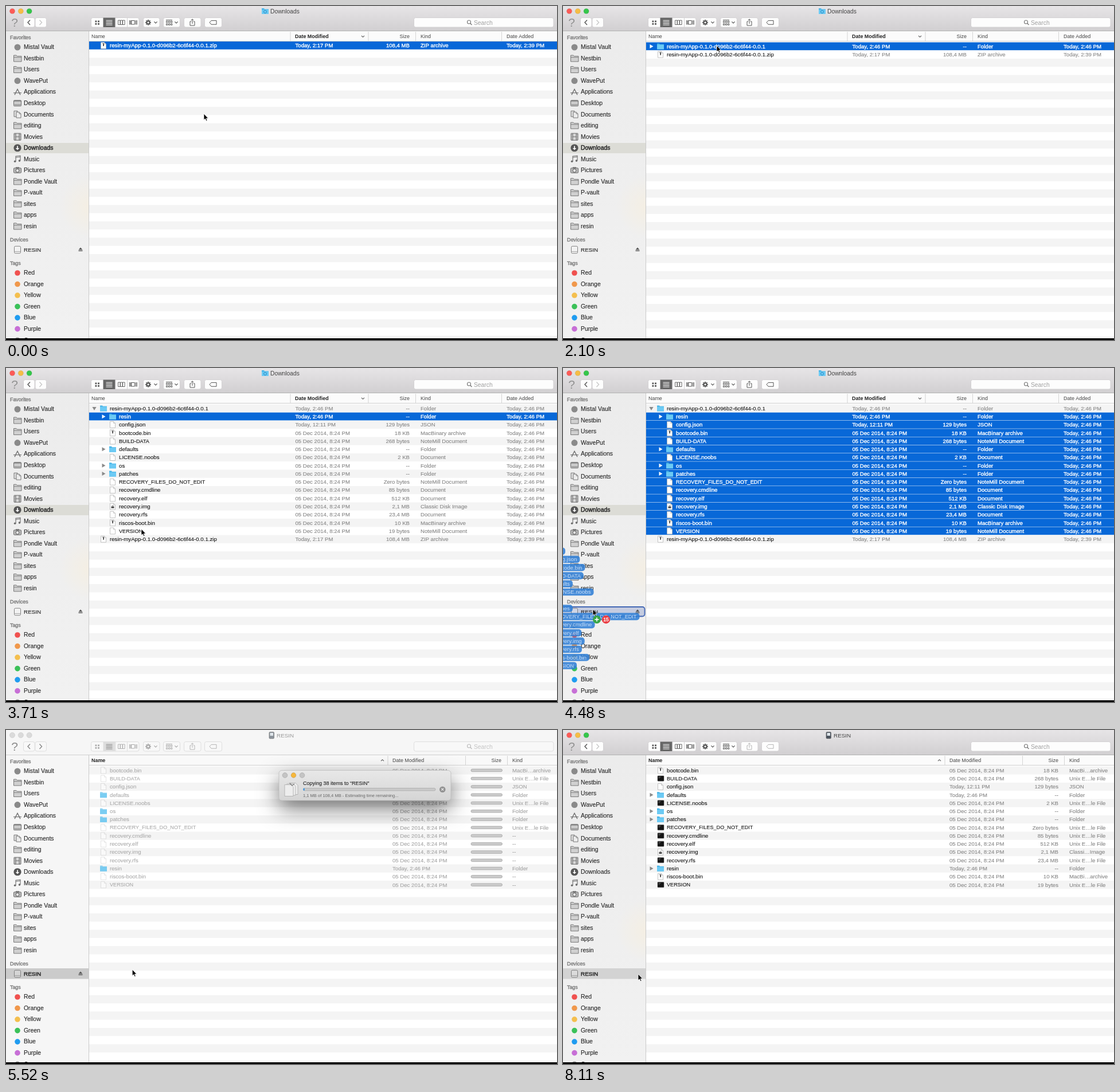
Animation of 961 by 583 pixels, one loop 8180 ms. Source, as an HTML page with a canvas:

```html
<!DOCTYPE html>
<html lang="en">
<head>
<meta charset="utf-8">
<title>Copying files</title>
<style>
html, body { margin: 0; width: 100%; height: 100%; overflow: hidden; background: #000; }
canvas { display: block; }
</style>
</head>
<body>
<canvas id="stage" width="961" height="583"></canvas>
<script>
const c = document.getElementById('stage').getContext('2d');
const LOOP = 8180, CUT = 4960, ROW = 14.27, TOP = 63.3, BLUE = '#0868d8';
const T = { unzip: 1400, expand: 2660, pick: 3290, pickAll: 3850, drag: 4060, rows: 5110, copy: 5520, done: 7200, eject: 8000 };
const clamp = (v, a = 0, b = 1) => Math.min(b, Math.max(a, v));

// ---- drawing helpers ----
function text(s, x, y, size, color, { align = 'left', bold = false, heavy = 0 } = {}) {
  c.font = `${bold ? 'bold ' : ''}${size}px "Liberation Sans", Arial, sans-serif`;
  c.textAlign = align;
  c.fillStyle = c.strokeStyle = color;
  c.fillText(s, x, y + size * .35);
  if (heavy) { c.lineWidth = heavy; c.strokeText(s, x, y + size * .35); }
}
function rect(x, y, w, h, fill) { c.fillStyle = fill; c.fillRect(x, y, w, h); }
function paint(fill, stroke, width = 1) {
  if (fill) { c.fillStyle = fill; c.fill(); }
  if (stroke) { c.strokeStyle = stroke; c.lineWidth = width; c.stroke(); }
}
function box(x, y, w, h, r, fill, stroke, width) {
  c.beginPath(); c.roundRect(x, y, w, h, r); paint(fill, stroke, width);
}
function dot(x, y, r, fill, stroke, width) {
  c.beginPath(); c.arc(x, y, r, 0, 7); paint(fill, stroke, width);
}
function shape(x, y, points, fill, stroke, width, open) {
  c.beginPath();
  for (let i = 0; i < points.length; i += 2) c.lineTo(x + points[i], y + points[i + 1]);
  if (!open) c.closePath();
  paint(fill, stroke, width);
}
const line = (x, y, points, color, width = 1) => shape(x, y, points, null, color, width, true);
function fade(y0, y1, a, b) {
  const g = c.createLinearGradient(0, y0, 0, y1);
  g.addColorStop(0, a); g.addColorStop(1, b);
  return g;
}
const nameSize = s => /^[A-Z_-]+$/.test(s) ? 9.15 : 9.7;

// ---- file data: name, type, size, kind, date ----
const DEC = '05 Dec 2014, 8:24 PM', NOW = 'Today, 2:46 PM', NOTE = 'NoteMill Document';
const file = (name, type, size = '--', kind = 'Folder', date = DEC) => ({ name, type, size, kind, date, added: NOW });
const APP = 'resin-myApp-0.1.0-d096b2-6c6f44-0.0.1';
const folder = file(APP, 'dir', '--', 'Folder', NOW);
const zip = { ...file(APP + '.zip', 'bin', '108,4 MB', 'ZIP archive', 'Today, 2:17 PM'), added: 'Today, 2:39 PM' };
const files = [
  file('resin', 'dir', '--', 'Folder', NOW),
  file('config.json', 'json', '129 bytes', 'JSON', 'Today, 12:11 PM'),
  file('bootcode.bin', 'bin', '18 KB', 'MacBinary archive'),
  file('BUILD-DATA', 'doc', '268 bytes', NOTE),
  file('defaults', 'dir'),
  file('LICENSE.noobs', 'doc', '2 KB', 'Document'),
  file('os', 'dir'),
  file('patches', 'dir'),
  file('RECOVERY_FILES_DO_NOT_EDIT', 'doc', 'Zero bytes', NOTE),
  file('recovery.cmdline', 'doc', '85 bytes', 'Document'),
  file('recovery.elf', 'doc', '512 KB', 'Document'),
  file('recovery.img', 'img', '2,1 MB', 'Classic Disk Image'),
  file('recovery.rfs', 'doc', '23,4 MB', 'Document'),
  file('riscos-boot.bin', 'bin', '10 KB', 'MacBinary archive'),
  file('VERSION', 'doc', '19 bytes', NOTE)
];
const shortKind = { dir: 'Folder', json: 'JSON', bin: 'MacBi…archive', doc: 'Unix E…le File', img: 'Classi…Image' };
const copied = [2, 3, 1, 4, 5, 6, 7, 8, 9, 10, 11, 12, 0, 13, 14].map(i => files[i]);

// ---- icons ----
function page(x, y, type, dim) {
  c.globalAlpha = dim ? .45 : 1;
  shape(x - 4.5, y - 5.5, [0, 0, 6, 0, 9, 3, 9, 11, 0, 11], '#fff', '#b4b4b4', .8);
  line(x - 4.5, y - 5.5, [6, 0, 6, 3, 9, 3], '#b4b4b4', .7);
  if (!dim && type === 'bin') { rect(x - .7, y - 4, 1.6, 5, '#333'); rect(x - 2.5, y - 4, 2, 1, '#888'); }
  if (!dim && type === 'img') { rect(x - 2.5, y, 5, 3, '#444'); rect(x - 1.5, y - 1.7, 3, 1, '#777'); }
  c.globalAlpha = 1;
}
function blueFolder(x, y, dim) {
  c.globalAlpha = dim ? .6 : 1;
  shape(x - 6, y - 5, [0, 0, 4, 0, 5, 1.4, 12, 1.4, 12, 10, 0, 10], '#48b5e8');
  rect(x - 6, y - 2.6, 12, 7.6, '#6ccaf4');
  c.globalAlpha = 1;
}
function terminal(x, y) {
  box(x - 5, y - 4.7, 11, 9.2, .8, '#151515', '#555', .5);
  rect(x - 3.5, y - 3, 4, .8, '#777'); rect(x - 3.5, y - 1.2, 2.5, .7, '#666');
}
function triangle(x, y, open, color) {
  shape(x, y, open ? [-3.6, -2.5, 3.6, -2.5, 0, 3.5] : [-2.5, -3.5, 3.5, 0, -2.5, 3.5], color);
}
const INK = '#6c6c6c';
const sideIcons = {
  disc: y => dot(20, y, 5.5, '#8a8a8a'),
  folder: y => {
    shape(13.5, y - 5.5, [0, 0, 4.5, 0, 6, 1.6, 13.5, 1.6, 13.5, 11, 0, 11], '#d0d0d0', INK, .9);
    line(13.5, y - 5.5, [0, 3.6, 13.5, 3.6], INK, .8);
  },
  apps: y => { line(20, y, [-5, 5, 0, -5, 5, 5], INK, 1.3); line(20, y, [-7, 1.5, 7, 1.5], INK, 1.1); },
  desktop: y => {
    box(13.5, y - 5, 13, 10, 1, '#ccc', INK, 1);
    rect(14, y - 4.5, 12, 1.6, '#888');
    for (let i = 0; i < 4; i++) rect(15 + i * 2.8, y + 2, 1.7, 1.5, INK);
  },
  pages: y => {
    shape(14, y - 6, [0, 0, 6, 0, 6, 10, 0, 10], '#ddd', INK, .9);
    shape(18, y - 4, [0, 0, 5, 0, 8, 3, 8, 10, 0, 10], '#ededed', INK, .9);
    line(18, y - 4, [5, 0, 5, 3, 8, 3], INK, .8);
  },
  film: y => {
    box(14, y - 6, 12, 12, .5, '#d8d8d8', INK, 1);
    line(20, y, [-3, -6, -3, 6], INK, 1); line(20, y, [3, -6, 3, 6], INK, 1); line(20, y, [-3, 0, 3, 0], INK, 1);
    for (let i = -4; i < 6; i += 3) { line(20, y + i, [-6, 0, -3, 0], INK, .8); line(20, y + i, [3, 0, 6, 0], INK, .8); }
  },
  down: y => {
    dot(20, y, 6.6, '#555');
    line(20, y, [0, -3.6, 0, 2], '#fff', 1.7); shape(20, y, [-3.2, .2, 3.2, .2, 0, 3.8], '#fff');
  },
  notes: y => {
    line(20, y, [-3, 4, -3, -5, 5, -6, 5, 2.5], INK, 1.1); line(20, y, [-3, -3, 5, -4], INK, 1);
    dot(15.6, y + 4, 1.8, INK); dot(23.5, y + 2.8, 1.8, INK);
  },
  camera: y => {
    box(13.5, y - 4, 13, 8.5, 1, '#bbb', INK, 1); rect(17, y - 5.6, 6, 2, INK);
    dot(20, y + .3, 2.8, '#eee', INK, 1.1);
  },
  drive: y => { box(14.5, y - 6.2, 11, 12.4, 2, '#fff3', '#777', .9); line(14.5, y, [0, 3.2, 11, 3.2], '#888', .8); }
};

// ---- sidebar ----
const favorites = [
  ['Mistal Vault', 'disc'], ['Nestbin', 'folder'], ['Users', 'folder'], ['WavePut', 'disc'],
  ['Applications', 'apps'], ['Desktop', 'desktop'], ['Documents', 'pages'], ['editing', 'folder'],
  ['Movies', 'film'], ['Downloads', 'down'], ['Music', 'notes'], ['Pictures', 'camera'],
  ['Pondle Vault', 'folder'], ['P-vault', 'folder'], ['sites', 'folder'], ['apps', 'folder'], ['resin', 'folder']
];
const tags = [['Red', '#f0514f'], ['Orange', '#f0984c'], ['Yellow', '#f4bf4e'], ['Green', '#3bc159'],
  ['Blue', '#209cf0'], ['Purple', '#c76fd6'], ['Gray', '#929292']];

function sidebar(s) {
  rect(0, 44, 144, 536, s.active ? fade(44, 580, '#ececec', '#f1f1f1') : '#f6f6f6');
  if (s.active) {
    const g = c.createRadialGradient(148, 350, 5, 148, 350, 55);
    g.addColorStop(0, '#f4efe4'); g.addColorStop(1, '#f4efe400');
    rect(90, 290, 54, 120, g);
  }
  if (s.downloads) rect(0, 239, 144, 18, '#dcdcd6');
  else rect(0, 416, 144, 18.5, s.active ? '#d3d3d3' : '#cbcbcb');
  if (s.target) box(-4, 417, 146.5, 16.5, 4, '#c5cce0', '#4267b4', 1.8);
  const label = (name, y, on) => text(name, 31, y - .3, 10.4, '#262626', { heavy: on ? .45 : .12 });
  const head = (name, y) => text(name, 7, y, 8.9, '#777', { heavy: .35 });
  head('Favorites', 55);
  favorites.forEach(([name, icon], i) => {
    const y = 72 + i * 19.53;
    sideIcons[icon](y);
    label(name, y, s.downloads && i === 9);
  });
  head('Devices', 408);
  sideIcons.drive(425.5);
  text('RESIN', 31, 425.3, 9.9, '#262626', { heavy: s.downloads ? .12 : .45 });
  if (s.t < T.eject) {
    shape(130, 425, [-3.5, .6, 0, -3.4, 3.5, .6], '#555');
    rect(126.5, 426.6, 7, 1.4, '#555');
  }
  head('Tags', 448.5);
  tags.forEach(([name, color], i) => {
    const y = 466 + i * 19.53;
    dot(20, y, 4.8, color);
    label(name, y);
  });
  rect(144, 44, 1, 536, '#cacaca');
}

// ---- title bar and toolbar ----
function toolbar(s) {
  const on = s.active, ink = on ? '#555' : '#aaa', edge = on ? '#d3d1d3' : '#dedede';
  rect(0, 0, 961, 44, on ? fade(0, 44, '#e7e5e7', '#d1cfd1') : '#f6f6f6');
  rect(0, 43, 961, 1, on ? '#b2b2b2' : '#d0d0d0');
  ['#fc5b57', '#f5bd46', '#35c64b'].forEach((color, i) =>
    dot(11 + i * 14.8, 9, 4.6, on ? color : '#dadada', on ? '#0002' : '#c9c9c9', .6));
  if (s.downloads) {
    blueFolder(452, 9); dot(452, 10, 2.5, null, '#2585bd', .9);
    text('Downloads', 461, 9.3, 10.3, '#444');
  } else {
    box(459, 3.5, 8.5, 11.5, 1.5, on ? '#4b535e' : '#8d949c', '#666', .6); rect(460.5, 5, 5.5, 5, '#dfe5ea');
    text('RESIN', 472, 9.3, 9.9, on ? '#444' : '#999');
  }
  text('?', 15, 28.5, 21, on ? '#929292' : '#8c8c8c', { align: 'center' });
  const button = (x, w) => box(x + .5, 20.5, w, 16.5, 3, on ? '#fdfdfd' : '#f8f8f8', edge, 1);
  button(30, 19.5); button(50.5, 19.5);
  line(40, 28.8, [2, -4.3, -2, 0, 2, 4.3], on ? '#555' : '#888', 1.4);
  line(60.5, 28.8, [-2, -4.3, 2, 0, -2, 4.3], on ? '#c8c8c8' : '#888', 1.4);
  button(148, 83.5);
  rect(169.5, 20.5, 21, 16.5, on ? '#666' : '#dedede');
  rect(190.5, 21, 1, 16, edge); rect(211, 21, 1, 16, edge);
  for (let i = 0; i < 4; i++) rect(155.5 + i % 2 * 4.6, 25.5 + (i >> 1) * 4.4, 2.8, 2.8, ink);
  for (let i = 0; i < 4; i++) rect(174.5, 24.7 + i * 2.6, 11, 1, on ? '#fff' : '#888');
  for (let i = 0; i < 3; i++) box(195.5 + i * 4, 25, 3.6, 7.5, 0, null, ink, .9);
  box(218.5, 25.5, 6, 6.5, 0, null, ink, 1);
  for (const x of [215, 216.8, 226, 227.8]) rect(x, 25, 1, 7.5, ink);
  button(239, 28.5); button(274, 29);
  for (let a = 0; a < 8; a++) {
    const u = Math.cos(a * Math.PI / 4), v = Math.sin(a * Math.PI / 4);
    line(248, 28.8, [u * 2, v * 2, u * 5, v * 5], ink, 1.7);
  }
  dot(248, 28.8, 2.6, null, ink, 2);
  for (let i = 0; i < 6; i++) box(279.5 + i % 3 * 4, i < 3 ? 26.5 : 30.9, 2.4, 2.4, 0, null, ink, .9);
  rect(279, 24, 11, 1, ink);
  for (const x of [261, 297]) line(x, 28.5, [-2.6, -1.2, 0, 1.4, 2.6, -1.2], ink, 1.2);
  const soft = s.downloads ? ink : '#b5b5b5';
  button(310, 29.5); button(346, 30);
  line(325, 29, [-1.8, -2, -4, -2, -4, 5, 4, 5, 4, -2, 1.8, -2], soft, 1);
  line(325, 29, [0, 2, 0, -6], soft, 1); line(325, 29, [-2.2, -4, 0, -6.2, 2.2, -4], soft, 1);
  shape(361, 28.8, [-6, 0, -3, -3.4, 6, -3.4, 6, 3.4, -3, 3.4], null, soft, 1);
  button(711, 243.5);
  dot(807.5, 28, 3, null, on ? '#777' : '#bbb', 1.1);
  line(807.5, 28, [2.2, 2.2, 5, 5], on ? '#777' : '#bbb', 1.3);
  text('Search', 816, 29, 10.3, on ? '#a0a0a0' : '#c4c4c4');
}

// ---- file list ----
function listHead(s) {
  rect(145, 44, 816, 17.5, s.active ? '#fbfbfb' : '#f9f9f9');
  rect(145, 61, 816, 1, '#cfcfcf');
  const seps = s.downloads ? [495.5, 631.5, 714, 864] : [665.5, 801, 874];
  seps.forEach(x => rect(x, 45, 1, 16, '#d4d4d4'));
  const h = (name, x, bold, align) => text(name, x, 53, 8.95, bold ? '#222' : '#444', { bold, align });
  h('Name', 149, !s.downloads);
  if (s.downloads) {
    h('Date Modified', 504, true); h('Size', 704, false, 'right'); h('Kind', 723); h('Date Added', 873);
    line(622.5, 53, [-2.5, -1.2, 0, 1.3, 2.5, -1.2], '#555', 1.1);
  } else {
    h('Date Modified', 674); h('Size', 864, false, 'right'); h('Kind', 883);
    line(656.5, 53, [-2.5, 1.2, 0, -1.3, 2.5, 1.2], '#555', 1.1);
  }
}

function row(s, f, index, { depth = 0, sel, open, state } = {}) {
  const y = TOP + s.shift + index * ROW + 7.1, x = depth * 16, dim = state === 'waiting';
  if (sel) rect(145, y - 7, 816, 13.75, BLUE);
  const ink = sel ? '#fff' : dim ? '#aaa' : '#151515';
  const grey = sel ? '#fff' : dim ? '#a2a2a2' : '#858585';
  const style = { heavy: sel ? .35 : .1 };
  if (f.type === 'dir') {
    if (!dim) triangle(154 + x, y, open, sel ? '#fff' : '#8a8a8a');
    blueFolder(170 + x, y, dim);
  } else if (!dim && state && f.type === 'doc') terminal(170, y);
  else page(170 + x, y, f.type, dim);
  text(f.name, 181 + x, y, nameSize(f.name), ink, style);
  const cell = (v, cx, align) => text(v, cx, y, 9.6, grey, { ...style, align });
  if (s.downloads) {
    cell(f.date, 504.5); cell(f.size, 704, 'right'); cell(f.kind, 723); cell(f.added, 873);
    return;
  }
  cell(f.name === 'defaults' && !dim ? NOW : f.name === 'config.json' && dim ? DEC : f.date, 674);
  if (dim) {
    box(811, y - 2.3, 54.5, 4.6, 2.3, '#cbcbcb', '#a4a4a4', .8);
    if (s.t > 6900 && f.name === 'recovery.rfs') box(812, y - 1.8, 4, 3.6, 1.8, '#fff');
  } else cell(f.size, 864, 'right');
  cell(dim && index > 7 && f.type !== 'dir' && s.t < 5700 ? '--' : shortKind[f.type], 883);
}

function list(s) {
  rect(145, 61, 816, 519, '#fff');
  for (let i = 0; i < 37; i += 2) rect(145, TOP + s.shift + i * ROW, 816, ROW, '#f4f4f4');
  const { t } = s;
  if (s.downloads) {
    if (t < T.unzip) return row(s, zip, 0, { sel: true });
    const shown = clamp((t - T.expand) / 210) * files.length;
    row(s, folder, 0, { sel: t < T.pick, open: shown > 0 });
    files.forEach((f, i) => {
      if (i < shown) row(s, f, i + 1, { depth: 1, sel: t >= T.pickAll || (t >= T.pick && i === 0) });
    });
    row(s, zip, 1 + shown);
  } else if (t >= T.rows) {
    copied.forEach((f, i) => {
      const order = f.type === 'dir' ? i * .9 : i;
      const ready = t >= T.done || (i < 11 || i === 12) && t > 5750 + order * 105;
      row(s, f, i, { state: ready ? 'ready' : 'waiting' });
    });
  }
}

// ---- copy progress panel ----
function panel(t) {
  const p = clamp((t - T.copy) / 1540);
  c.save();
  c.shadowColor = '#0008'; c.shadowBlur = 36; c.shadowOffsetY = 14;
  box(476, 70.5, 300, 52.5, 5, '#ddd');
  c.restore();
  box(476, 70.5, 300, 52.5, 5, fade(70, 123, '#e8e8e8', '#d5d5d5'), '#b9b9b9', .7);
  ['#c4c4c4', '#f6b73c', '#c4c4c4'].forEach((color, i) => dot(486.5 + i * 15, 79, 4.4, color, '#0003', .7));
  for (let i = 2; i >= 0; i--)
    shape(486 + i * 4, 95.5 - i * 1.5, [0, 0, 11, 0, 15, 4, 15, 20, 0, 20], '#ededed', '#aaa', .8);
  line(496, 95, [-1, -2, 3, 2, 7, -1], '#777', 1.1);
  const size = (1.1 + 107.3 * p).toFixed(1).replace('.', ',');
  const left = t < 5900 ? 'Estimating time remaining...' : 'About 5 seconds';
  text(`Copying ${Math.round(38 * (1 - p))} items to “RESIN”`, 518, 92.5, 9, '#222', { heavy: .1 });
  box(518.5, 101.5, 230.5, 4.5, 2.2, '#c9c9c9', '#aaa', .8);
  box(518.5, 101.5, 2.3 + 228.2 * p, 4.5, 2.2, '#3b97e6');
  text(`${size} MB of 108,4 MB - ${left}`, 518, 114.5, 7.55, '#666');
  dot(761.3, 103.7, 5.3, '#929292');
  line(761.3, 103.7, [-2, -2, 2, 2], '#eee', 1.1); line(761.3, 103.7, [2, -2, -2, 2], '#eee', 1.1);
}

// ---- pointer and dragged items ----
const path = [
  [0, 345, 188], [350, 335, 165], [800, 282, 70], [2100, 268, 69], [2520, 154, 70], [2800, 154, 70],
  [3220, 214, 84], [3360, 214, 84], [3710, 236, 281], [3850, 236, 283], [4060, 271, 186],
  [4410, 56, 415], [4480, 52, 421], [4960, 52, 421], [5380, 220, 418], [6400, 224, 418],
  [7060, 229.5, 418], [7410, 229, 418], [7970, 133, 425], [8110, 131, 426]
];
function pointer(t) {
  const i = Math.max(1, path.findIndex(k => k[0] >= t));
  const [t0, x0, y0] = path[i - 1], [t1, x1, y1] = path[i];
  const u = clamp((t - t0) / (t1 - t0)), e = u * u * (3 - 2 * u);
  return [x0 + (x1 - x0) * e, y0 + (y1 - y0) * e];
}
function dragged(x, y) {
  const dx = x - 271, dy = y - 186;
  files.forEach((f, i) => {
    const px = 197 + dx, py = TOP + 7.1 + (i + 1) * ROW + dy, size = nameSize(f.name);
    c.font = `${size}px "Liberation Sans", Arial, sans-serif`;
    const w = c.measureText(f.name).width;
    c.globalAlpha = .6;
    if (f.type === 'dir') blueFolder(px - 11, py, true); else page(px - 11, py, f.type, true);
    c.globalAlpha = .88;
    box(px - 4, py - 6.3, w + 9, 12.6, 5, '#3280d6');
    text(f.name, px, py, size, '#dcebfc');
    c.globalAlpha = 1;
  });
}
function badges(x, y) {
  dot(x + 7, y + 18, 7, '#38a548');
  line(x + 7, y + 18, [-3.6, 0, 3.6, 0], '#fff', 1.6); line(x + 7, y + 18, [0, -3.6, 0, 3.6], '#fff', 1.6);
  dot(x + 23, y + 18, 7.2, '#ea3f45');
  text('15', x + 23, y + 18, 8.6, '#fff', { align: 'center', heavy: .3 });
}

function draw(t) {
  const downloads = t < CUT, [x, y] = pointer(t), dragging = t >= T.drag && downloads;
  const s = {
    t, downloads, active: downloads || t >= T.done,
    shift: t < T.unzip ? -1.4 : 0,
    target: dragging && x < 144 && y > 412
  };
  list(s);
  listHead(s);
  sidebar(s);
  toolbar(s);
  if (!s.active && t >= T.rows) panel(t);
  if (dragging) dragged(x, y);
  rect(0, 580, 961, 3, '#050505');
  shape(x, y, [0, 0, 0, 11, 2.5, 8.8, 4.2, 12.6, 6, 11.8, 4.3, 8.2, 7.6, 8], '#000', '#fff', .8);
  if (dragging) badges(x, y);
}

// the picture holds for 70 ms steps, with one longer pause before the cut
const step = t => Math.floor(t / 70) * 70;
const snap = t => t < 4760 ? step(t) : t < CUT ? 4760 : CUT + step(t - CUT);
const start = performance.now();
function tick() {
  draw(snap((performance.now() - start) % LOOP));
  requestAnimationFrame(tick);
}
tick();
</script>
</body>
</html>
```
